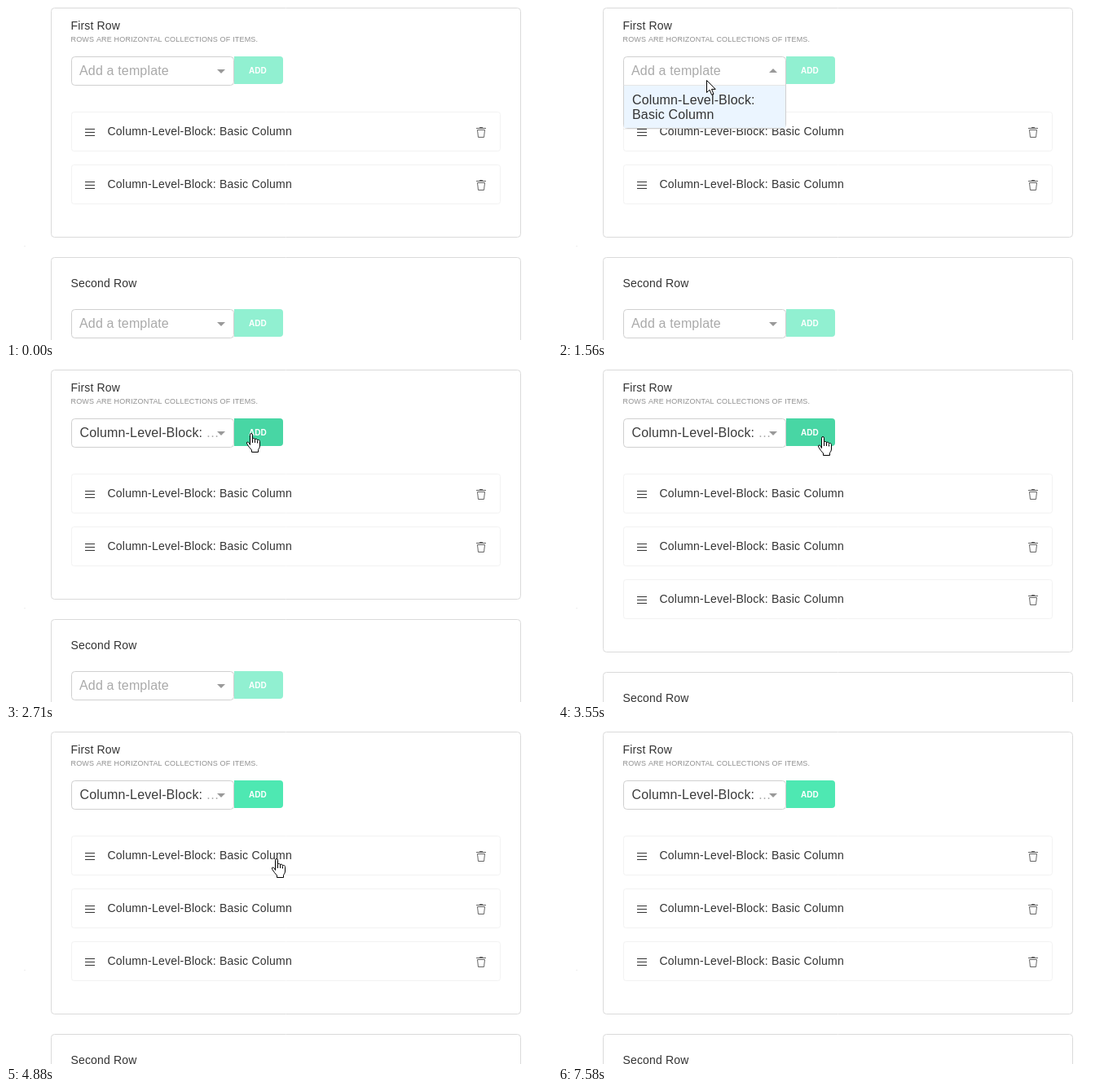
Animation, 670 px wide and 411 px high, one loop 8.63 s. Source, as an HTML page with a canvas:

```html
<!DOCTYPE html>
<html lang="en">
<head>
<meta charset="utf-8">
<title>Row builder</title>
<style>
  html, body { margin: 0; width: 100%; height: 100%; overflow: hidden; background: #fff; }
  canvas { display: block; }
</style>
</head>
<body>
<canvas id="stage" width="670" height="411"></canvas>
<script>
const ctx = document.getElementById('stage').getContext('2d');
const LOOP = 8630;
const OPEN = 1050, CHOSEN = 1790, CLICK = 2710, ADDED = 2860;
const FONT = '"Liberation Sans", Arial, sans-serif';
const ITEM = 'Column-Level-Block: Basic Column';
const INK = '#333', BORDER = '#d0d0d0';

const easeIn = u => u * u;
const easeOut = u => u * (2 - u);
const smooth = u => u * u * (3 - 2 * u);

// Each move bends from the previous stop past `via` to `to`
const OFFSTAGE = [612, 452];
const moves = [
  { start: 410, end: 1050, steps: 15, via: [380, 245], to: [192, 71], ease: easeOut },
  { start: 1460, end: 1790, steps: 8, via: [176, 106], to: [161, 122], ease: smooth },
  { start: 2250, end: 2710, steps: 9, via: [225, 117], to: [301, 80], ease: smooth },
  { start: 3550, end: 3910, steps: 9, via: [660, 140], to: [214, 194], ease: smooth },
  { start: 4190, end: 4880, steps: 16, via: [214, 384], to: [332, 158], ease: smooth },
  { start: 7380, end: 7580, steps: 5, via: [523, 339], to: [715, 520], ease: easeIn }
];

const arrowShape = new Path2D('M.5 .5V15.5L4 12.2L6.6 18.3L9 17.3L6.5 11.4H11.2Z');
const handShape = new Path2D('M4.5 14.5V2.2Q4.5 .5 6 .5T7.5 2.2V7.5Q8.2 6.3 9.4 6.5T10.5 8' +
  'Q11.2 7 12.3 7.3T13.5 9Q14.5 8.2 15.5 8.7T16.5 10.5V16Q16.5 18 14.5 20.5V23.5H6.5V21' +
  'Q3.5 18 .8 13.5Q-.2 11.5 1.2 11Q2.3 10.8 3.2 12.2Z');
const handLines = new Path2D('M7.5 7.5V12M10.5 8V12M13.5 9.5V12.5');

function pointerAt(t) {
  let pos = OFFSTAGE, from = OFFSTAGE;
  for (const { start, end, steps, via, to, ease } of moves) {
    if (t < start) break;
    const step = Math.floor((t - start) / (end - start) * (steps - 1) + 0.1);
    const u = ease(Math.min(1, (step + 1) / steps));
    const a = from;
    pos = a.map((p, i) => Math.round((1 - u) ** 2 * p + 2 * u * (1 - u) * via[i] + u * u * to[i]));
    from = to;
  }
  return pos;
}

const inside = ([px, py], x, y, w, h) => px >= x && px < x + w && py >= y && py < y + h;

function text(str, x, y, size, color, spacing = 0.16, weight = 'normal') {
  ctx.font = `${weight} ${size}px ${FONT}`;
  ctx.letterSpacing = spacing + 'px';
  ctx.fillStyle = color;
  ctx.fillText(str, x, y);
}

function rect(x, y, w, h, color) {
  ctx.fillStyle = color;
  ctx.fillRect(x, y, w, h);
}

function round(x, y, w, h, r, fill) {
  ctx.beginPath();
  ctx.roundRect(x, y, w, h, r);
  ctx.fillStyle = fill;
  ctx.fill();
}

function box(x, y, w, h, r, stroke) {
  round(x + 0.5, y + 0.5, w - 1, h - 1, r, '#fff');
  ctx.lineWidth = 1;
  ctx.strokeStyle = stroke;
  ctx.stroke();
}

function select(y, { open, focused, hover, chosen } = {}) {
  if (focused) round(77, y - 3, 206, 42, 6, '#e5f2ff');
  else if (hover) rect(82, y + 36, 196, 1, 'rgba(0,0,0,.06)');
  box(80, y, 200, 36, open ? [4, 4, 0, 0] : 4, focused ? '#007eff' : BORDER);

  if (chosen) {
    text('Column-Level-Block:', 90.5, y + 23, 16, '#3c3c3c');
    ctx.save();
    ctx.beginPath();
    ctx.rect(244, y, 17, 36);
    ctx.clip();
    text('…', 245.5, y + 23, 16, '#aaa');
    ctx.restore();
  } else {
    text('Add a template', 90, y + 23, 16, '#aaa');
  }

  const base = open ? y + 20 : y + 16;
  ctx.beginPath();
  ctx.moveTo(259, base);
  ctx.lineTo(269, base);
  ctx.lineTo(264, open ? base - 5 : base + 5);
  ctx.fillStyle = '#999';
  ctx.fill();
}

function button(y, color) {
  round(280, y, 60, 34, [0, 4, 4, 0], color);
  text('ADD', 298, y + 21, 10, '#fff', 0, 'bold');
}

function menu() {
  rect(80, 151, 200, 1, 'rgba(0,0,0,.06)');
  box(80, 97, 200, 54, [0, 0, 4, 4], BORDER);
  rect(81, 97, 198, 1, '#e6e6e6');
  rect(81, 98, 198, 52, '#ebf5ff');
  text('Column-Level-Block:', 91, 121, 16, INK);
  text('Basic Column', 91, 139, 16, INK);
}

function trash(x, y) {
  const color = '#666';
  rect(x + 4, y, 4, 1, color);
  rect(x, y + 1, 12, 1, color);
  ctx.beginPath();
  ctx.moveTo(x + 1.5, y + 3.5);
  ctx.lineTo(x + 10.5, y + 3.5);
  ctx.lineTo(x + 9.5, y + 12.5);
  ctx.lineTo(x + 2.5, y + 12.5);
  ctx.closePath();
  ctx.lineWidth = 1;
  ctx.strokeStyle = color;
  ctx.stroke();
}

function item(y) {
  box(80, y, 527, 49, 3, '#f2f2f2');
  for (let i = 0; i < 3; i++) rect(97, y + 21 + i * 4, 12, 1, INK);
  text(ITEM, 124.5, y + 29, 14, INK, 0.22);
  trash(577, y + 19);
}

function pointer([x, y], hand) {
  const shape = hand ? handShape : arrowShape;
  ctx.save();
  ctx.translate(hand ? x - 6 : x, y);
  ctx.fillStyle = '#fff';
  ctx.strokeStyle = '#000';
  ctx.lineWidth = 1;
  ctx.fill(shape);
  ctx.stroke(shape);
  if (hand) ctx.stroke(handLines);
  ctx.restore();
}

function draw(t) {
  const pos = pointerAt(t);
  const open = t >= OPEN && t < CHOSEN;
  const chosen = t >= CHOSEN;
  const focused = chosen && t < CLICK;
  const count = t >= ADDED ? 3 : 2;
  const shift = (count - 2) * 65;
  const overAdd = chosen && inside(pos, 280, 62, 60, 34);
  let hand = overAdd || (open && inside(pos, 80, 98, 200, 52));

  rect(0, 0, 670, 411, '#fff');
  rect(22, 295, 2, 1, '#eee');

  box(55, 2, 577, 283 + shift, 4, '#dadada');
  text('First Row', 79.5, 29, 14, INK);
  text('ROWS ARE HORIZONTAL COLLECTIONS OF ITEMS.', 79.5, 44, 9, '#909090', 0.18);
  for (let i = 0; i < count; i++) {
    const y = 130 + i * 65;
    item(y);
    if (!open && inside(pos, 80, y, 527, 49)) hand = true;
  }
  button(62, overAdd ? '#48d6a4' : chosen ? '#4ee8b2' : '#91f0d1');
  select(62, { open, focused, chosen, hover: inside(pos, 80, 62, 200, 36) });
  if (open) menu();

  box(55, 309 + shift, 577, 283, 4, '#dadada');
  text('Second Row', 79.5, 346 + shift, 14, INK);
  button(373 + shift, '#91f0d1');
  select(373 + shift);

  pointer(pos, hand);
}

const began = performance.now();
function tick() {
  draw((performance.now() - began) % LOOP);
  requestAnimationFrame(tick);
}
tick();
</script>
</body>
</html>
```
